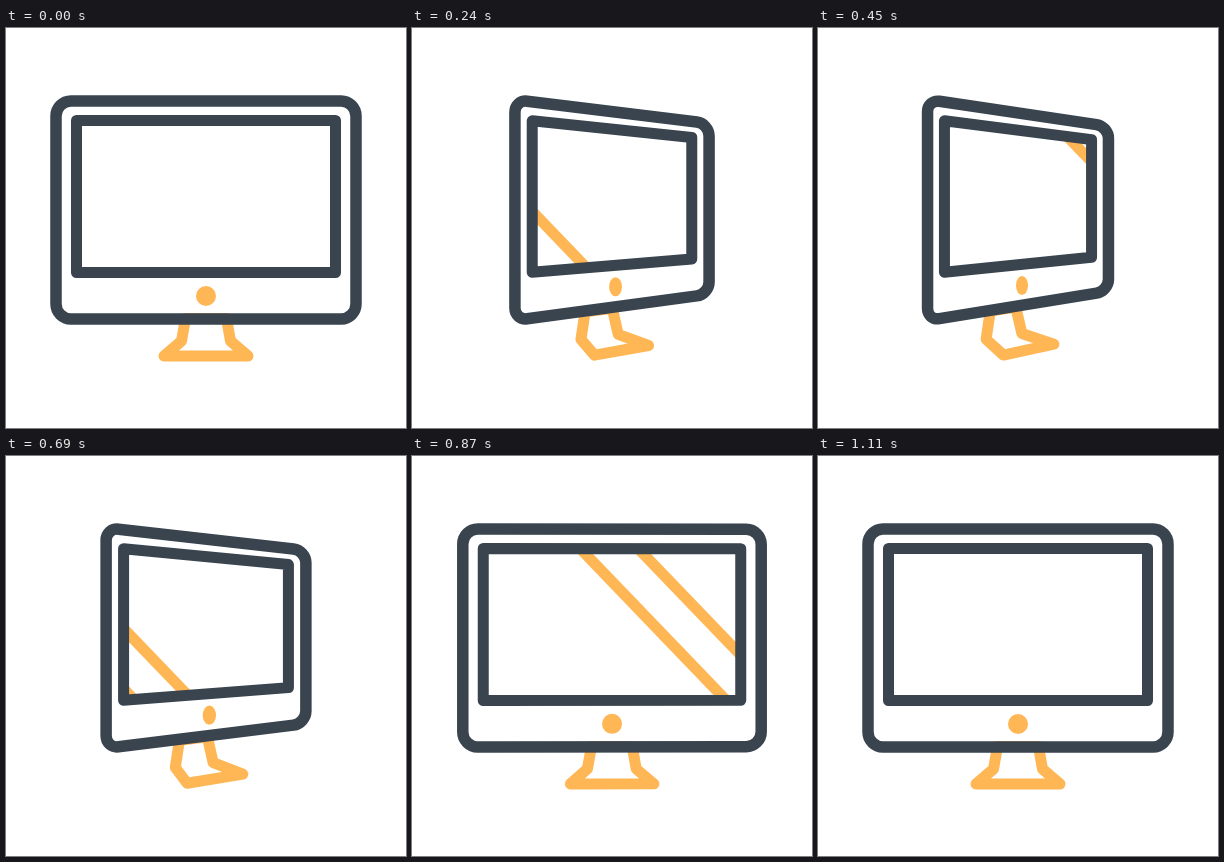
Animation, 400 px wide and 400 px high, one loop 1200 ms. Source, as an HTML page:

```html
<!DOCTYPE html>
<html lang="en">
<head>
<meta charset="utf-8">
<title>Turning monitor</title>
<style>
  html, body { margin: 0; width: 100%; height: 100%; overflow: hidden; background: #fff; }
  svg { display: block; width: 100%; height: 100%; }
  .dark, .warm { fill: none; stroke-width: 11; stroke-linejoin: round; stroke-linecap: round; }
  .dark { stroke: #39444f; }
  .warm { stroke: #ffb655; }
  #body { stroke-width: 11.5; }
  #button { fill: #ffb655; }
</style>
</head>
<body>
<svg viewBox="0 0 400 400">
  <clipPath id="glass"><path id="glassShape"/></clipPath>
  <path id="stand" class="warm"/>
  <path id="glints" class="warm" clip-path="url(#glass)"/>
  <path id="screen" class="dark"/>
  <path id="body" class="dark"/>
  <ellipse id="button"/>
</svg>
<script>
const LOOP = 1200, STEP = 30, LAST = 1110;
const CENTER = 200, HORIZON = 177;
const GLINT_GAP = 58, GLINT_SLOPE = 1.04;
const $ = id => document.getElementById(id);
const lerp = (a, b, k) => a + (b - a) * k;
const clamp = u => Math.min(Math.max(u, 0), 1);
const smooth = u => u * u * (3 - 2 * u);
const polygon = pts => "M" + pts.map(p => p.join(" ")).join("L") + "Z";

// Point d px from the centre line; k = 0 faces front, 1 is fully turned
function project(d, y, k, squeeze = 0.6, dx = 0, dy = 0) {
  const scale = 0.885 - 0.00086 * d;
  return [
    CENTER + lerp(d, d * squeeze + dx, k),
    lerp(y, HORIZON + (y - HORIZON) * scale + dy, k)
  ];
}

const panel = (half, top, bottom, k, squeeze) =>
  [[-half, top], [half, top], [half, bottom], [-half, bottom]]
    .map(([d, y]) => project(d, y, k, squeeze));

// Half width, height, then squeeze and shift when turned
const LEG = [[20.5, 290.6, 0.62, -15, 3.5], [24.5, 313, 0.73, -14, 11], [42, 328, 0.6, 10.7, 11]];

function standPoints(k) {
  const side = sign => LEG.map(([d, y, ...turned]) => project(sign * d, y, k, ...turned));
  return [...side(-1), ...side(1).reverse()];
}

function rounded(pts, r) {
  const n = pts.length, c = 0.552;
  const toward = (p, q, f) => {
    const s = r * f / Math.hypot(q[0] - p[0], q[1] - p[1]);
    return [lerp(p[0], q[0], s), lerp(p[1], q[1], s)];
  };
  return pts.map((p, i) => {
    const prev = pts[(i + n - 1) % n], next = pts[(i + 1) % n];
    return (i ? "L" : "M") + toward(p, prev, 1).join(" ") +
      "C" + [toward(p, prev, 1 - c), toward(p, next, 1 - c), toward(p, next, 1)].join(" ");
  }).join("") + "Z";
}

// Turns away with an ease-out, returns with an ease-in-out
function turn(t) {
  if (t < 600) return 1 - (1 - clamp(t / 360)) ** 2;
  const u = clamp((t - 600) / 300), p = 2.25;
  return u < 0.5 ? 1 - 0.5 * (2 * u) ** p : 0.5 * (2 - 2 * u) ** p;
}

const sweep = (t, start, end, from, to) =>
  t < start || t > end ? "" : glints(lerp(from, to, smooth((t - start) / (end - start))));

function glints(x) {
  const line = x => [80, 260]
    .map(y => `${x + (y - 97) / GLINT_SLOPE} ${y}`).join("L");
  return "M" + line(x) + "M" + line(x - GLINT_GAP);
}

function draw(t) {
  const k = turn(t);
  const screen = polygon(panel(129.5, 92.5, 244.5, k, 0.568));
  $("screen").setAttribute("d", screen);
  $("glassShape").setAttribute("d", screen);
  $("body").setAttribute("d", rounded(panel(150, 73, 291, k, 0.603), 15 - 3 * k));
  $("stand").setAttribute("d", polygon(standPoints(k)));
  $("glints").setAttribute("d", sweep(t, 120, 540, -38, 341) + sweep(t, 570, 1080, -8, 370));

  const [cx, cy] = project(0, 268, k, 0.6, 4);
  const button = { cx, cy, rx: lerp(10, 6, k), ry: lerp(10, 9.5, k) };
  for (const name in button) $("button").setAttribute(name, button[name]);
}

const start = performance.now();
function tick() {
  const t = (performance.now() - start) % LOOP;
  draw(Math.min(Math.floor(t / STEP) * STEP, LAST));
  requestAnimationFrame(tick);
}
tick();
</script>
</body>
</html>
```
